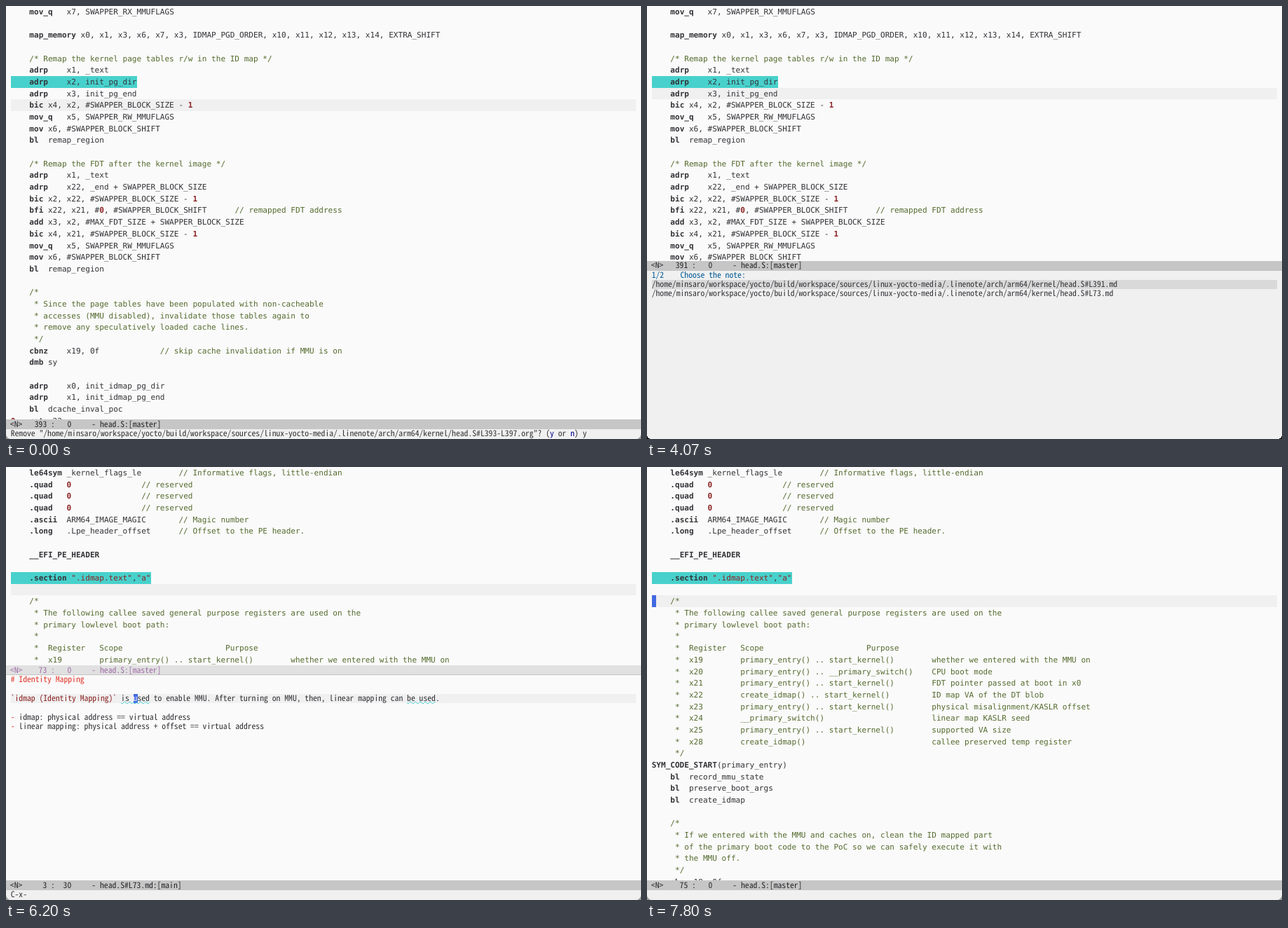
An HTML page for the animation above (8 s loop, 906 by 618 pixels).

```html
<!DOCTYPE html>
<html lang="en">
<head>
<meta charset="utf-8">
<title>Line notes</title>
<style>
:root {
  --code-font: "DejaVu Sans Mono", monospace;
  --ui-font: "Noto Sans Mono CJK KR", "Noto Sans Mono CJK JP", "Noto Sans Mono", monospace;
  --row: 16.6667px;
  --line: 13.3333px;
  --left: 6.6667px;
}
html, body { margin: 0; width: 100%; height: 100%; overflow: hidden; background: #999; }
pre { margin: 0; }
#stage {
  position: relative; width: 906px; height: 618px; overflow: hidden;
  border-radius: 0 0 8px 8px; background: #fafafa; color: #333338;
  text-rendering: geometricPrecision; font-variant-ligatures: none;
}
#stage div, #stage pre { position: absolute; }
.pane { left: 0; width: 906px; overflow: hidden; background: #fafafa; }
.code { left: var(--left); top: var(--code-dy); font: var(--code-size)/var(--row) var(--code-font); }
.ui { left: var(--left); font: var(--ui-size)/var(--line) var(--ui-font); margin-top: var(--ui-dy); }
.hl { left: var(--left); width: 892px; height: var(--row); background: #f0f0f0; }
.mark { left: var(--left); height: var(--row); background: #48d1cc; }
.cur { left: var(--left); width: 6px; height: var(--row); background: #4169e1; }
.small { height: var(--line); }
.k { font-weight: bold; }
.c { color: #556b2f; }
.n { color: #8b2323; font-weight: bold; }
.s { color: #8b2323; }
.bar {
  left: 0; width: 906px; height: 14px; background: #c6c6c6; color: #26262a; white-space: pre;
  font: var(--ui-size)/var(--line) var(--ui-font);
}
.bar span { position: relative; left: 5.8px; top: calc(var(--ui-dy) + .3px); }
.key { color: #00008b; background: #f6f6f6; }
.head { color: #e0372c; }
.wavy { text-decoration: underline wavy #3fd0d4 1px; text-underline-offset: 0; text-decoration-skip-ink: none; }
.blue { color: #005a96; }
#picker { top: 363.67px; height: 255px; background: #f0f0f0; }

/* Hard cuts on one 8 s clock */
.t { opacity: 0; animation: 8s step-end infinite; }
.m { animation: 8s step-end infinite; }
#docA { animation-name: docA; }
#docB { animation-name: docB; }
#shiftB { animation-name: shiftB; }
#hlA { animation-name: rowA; }
#hlB { animation-name: rowB; }
#curA { animation-name: blinkA; }
#curB { animation-name: rowB, blinkB; }
#picker { animation-name: picker; }
#pick { animation-name: pick; }
#curP { animation-name: blinkP; }
.first { animation-name: first; }
.second { animation-name: second; }
#note { animation-name: note; }
#curN { animation-name: blinkN; }
#inkN { animation-name: inkN; }
#barTop { animation-name: gain; }
#barNote { animation-name: note, lose; }
#bar393 { animation-name: bar393; }
#bar73 { animation-name: bar73; }
#bar74 { animation-name: bar74; }
#bar75 { animation-name: bar75; }
#ask { animation-name: ask; }
#keys { animation-name: keys; }

@keyframes docA { 0% { opacity: 1 } 53.375% { opacity: 0 } }
@keyframes docB { 53.375% { opacity: 1 } 100% { opacity: 1 } }
@keyframes shiftB { 0% { top: 0 } 64.125%, 100% { top: -33.3333px } }
@keyframes rowA { 0% { top: 133.333px } 30%, 100% { top: 116.667px } }
@keyframes rowB {
  0% { top: 200px } 79.125% { top: 183.333px }
  96.625% { top: 200px } 97.5%, 100% { top: 216.667px }
}
@keyframes blinkA { 15% { opacity: 1 } 21.625% { opacity: 0 } 26.625% { opacity: 1 } 30% { opacity: 0 } }
@keyframes blinkB { 79.125% { opacity: 1 } 91.625% { opacity: 0 } 96.625%, 100% { opacity: 1 } }
@keyframes picker { 30% { opacity: 1 } 64.125% { opacity: 0 } }
@keyframes pick { 0% { top: 27.33px } 53.375%, 100% { top: 40.67px } }
@keyframes blinkP {
  30% { opacity: 1 } 38.375% { opacity: 0 } 44.125% { opacity: 1 } 50.875% { opacity: 0 }
  53.375% { opacity: 1 } 59.125% { opacity: 0 }
}
@keyframes first { 0% { opacity: 1 } 53.375% { opacity: 0 } }
@keyframes second { 53.375%, 100% { opacity: 1 } }
@keyframes note { 64.125% { opacity: 1 } 85% { opacity: 0 } }
@keyframes blinkN { 64.125% { opacity: 1 } 70% { opacity: 0 } 76.625% { opacity: 1 } 79.125% { opacity: 0 } }
@keyframes inkN { 64.125% { color: #fafafa } 70% { color: #333338 } 76.625% { color: #fafafa } 79.125% { color: #333338 } }
@keyframes gain {
  0% { background: #e1e1e1; color: #a06ca8; box-shadow: inset 0 -1px #c4c4c4 }
  79.125%, 100% { background: #c6c6c6; color: #26262a; box-shadow: none }
}
@keyframes lose {
  0% { background: #c6c6c6; color: #26262a; box-shadow: none }
  79.125%, 100% { background: #e1e1e1; color: #a06ca8; box-shadow: inset 0 -1px #c4c4c4 }
}
@keyframes bar393 { 0% { opacity: 1 } 30% { opacity: 0 } }
@keyframes bar73 { 85% { opacity: 1 } 96.625% { opacity: 0 } }
@keyframes bar74 { 96.625% { opacity: 1 } 97.5% { opacity: 0 } }
@keyframes bar75 { 97.5%, 100% { opacity: 1 } }
@keyframes ask { 0% { opacity: 1 } 26.625% { opacity: 0 } }
@keyframes keys { 76.625% { opacity: 1 } 79.125% { opacity: 0 } 82.5% { opacity: 1 } 85% { opacity: 0 } }
</style>
</head>
<body>
<div id="stage">
  <div id="docA" class="pane t" style="top:0;height:590.33px">
    <div id="hlA" class="hl m"></div>
    <div class="mark" style="top:100px;width:180px"></div>
    <pre id="codeA" class="code"></pre>
    <div id="curA" class="cur t" style="top:133.333px"></div>
  </div>

  <div id="docB" class="pane t" style="top:0;height:590.33px">
    <div id="shiftB" class="m" style="left:0;width:906px;height:640px">
      <div id="hlB" class="hl m"></div>
      <div class="mark" style="top:183.333px;width:200px"></div>
      <pre id="codeB" class="code"></pre>
      <div id="curB" class="cur t"></div>
    </div>
  </div>

  <div id="note" class="pane t" style="top:283.33px;height:307px">
    <div class="hl small" style="top:40.67px"></div>
    <div id="curN" class="cur small t" style="left:182px;top:40.67px"></div>
    <pre class="ui" style="top:14px"><span class="head"># Identity Mapping</span>

<span class="s">`idmap (Identity Mapping)`</span> <span class="wavy">is <span id="inkN" class="m">u</span>sed</span> to enable MMU. After turning on MMU, then, linear mapping can <span class="wavy">be used</span>.

<span class="head">-</span> idmap: physical address == virtual address
<span class="head">-</span> linear mapping: physical address + offset == virtual address</pre>
    <div id="barTop" class="bar m" style="top:0"><span>&lt;N>    73 :   0     - head.S:[master]</span></div>
  </div>

  <div class="pane" style="top:604.33px;height:14px;background:#f0f0f0">
    <pre id="ask" class="ui t" style="top:0">Remove "/home/minsaro/workspace/yocto/build/workspace/sources/linux-yocto-media/.linenote/arch/arm64/kernel/head.S#L393-L397.org"? (<span class="key">y</span> or <span class="key">n</span>) y</pre>
    <pre id="keys" class="ui t" style="top:0">C-x-</pre>
  </div>

  <div id="bar393" class="bar t" style="top:590.33px"><span>&lt;N>   393 :   0     - head.S:[master]</span></div>
  <div id="barNote" class="bar t" style="top:590.33px"><span>&lt;N>     3 :  30     - head.S#L73.md:[main]</span></div>
  <div id="bar73" class="bar t" style="top:590.33px"><span>&lt;N>    73 :   0     - head.S:[master]</span></div>
  <div id="bar74" class="bar t" style="top:590.33px"><span>&lt;N>    74 :   0     - head.S:[master]</span></div>
  <div id="bar75" class="bar t" style="top:590.33px"><span>&lt;N>    75 :   0     - head.S:[master]</span></div>

  <div id="picker" class="pane t">
    <div class="bar t first" style="top:0"><span>&lt;N>   391 :   0     - head.S:[master]</span></div>
    <div class="bar t second" style="top:0"><span>&lt;N>    73 :   0     - head.S:[master]</span></div>
    <div id="pick" class="hl small m" style="background:#d9d9d9"></div>
    <div id="curP" class="cur small t" style="left:147px;top:14px"></div>
    <pre class="ui" style="top:14px"><span class="blue"><span class="t first">1</span>/2    Choose the note: </span>
/home/minsaro/workspace/yocto/build/workspace/sources/linux-yocto-media/.linenote/arch/arm64/kernel/head.S#L391.md
/home/minsaro/workspace/yocto/build/workspace/sources/linux-yocto-media/.linenote/arch/arm64/kernel/head.S#L73.md</pre>
    <pre class="ui blue t second" style="top:14px">2</pre>
  </div>
</div>

<script>
const root = document.documentElement;
const ctx = document.createElement('canvas').getContext('2d');

// Choose the font size for a cell width, and the shift that puts the baseline in place
function fit(name, cell, line, base) {
  const font = getComputedStyle(root).getPropertyValue(`--${name}-font`);
  ctx.font = `100px ${font}`;
  const m = ctx.measureText('0');
  const size = cell / m.width * 100;
  const up = Math.round(m.fontBoundingBoxAscent * size / 100);
  const down = Math.round(m.fontBoundingBoxDescent * size / 100);
  root.style.setProperty(`--${name}-size`, `${size}px`);
  root.style.setProperty(`--${name}-dy`, `${base - (line + up - down) / 2}px`);
}
fit('code', 20 / 3, 50 / 3, 12.9);
fit('ui', 35 / 6, 40 / 3, 11.3);

// Groups: comment, string, keyword, number
const token = /(?<c>\/\/.*|\/\*.*|(?<=^\s*)\*.*)|(?<s>"[^"]*")|(?<k>(?<=^(?:0:)?\s*)[a-z_.][\w.]*)|(?<n>\b\d+\b)/gi;
const paint = text => text.replace(token, (hit, ...rest) => {
  const groups = rest.at(-1);
  const kind = Object.keys(groups).find(g => groups[g] !== undefined);
  return `<span class="${kind}">${hit}</span>`;
});
const fill = (id, text) => {
  document.getElementById(id).innerHTML = text.split('\n').map(paint).join('\n');
};

const use = (reg, scope, purpose) => `     *  ${reg.padEnd(11)}${scope.padEnd(41)}${purpose}`;
const note = (code, col, text) => `    ${code}`.padEnd(col) + `// ${text}`;
const run = 'primary_entry() .. start_kernel()';

fill('codeA', `    mov_q   x7, SWAPPER_RX_MMUFLAGS

    map_memory x0, x1, x3, x6, x7, x3, IDMAP_PGD_ORDER, x10, x11, x12, x13, x14, EXTRA_SHIFT

    /* Remap the kernel page tables r/w in the ID map */
    adrp    x1, _text
    adrp    x2, init_pg_dir
    adrp    x3, init_pg_end
    bic x4, x2, #SWAPPER_BLOCK_SIZE - 1
    mov_q   x5, SWAPPER_RW_MMUFLAGS
    mov x6, #SWAPPER_BLOCK_SHIFT
    bl  remap_region

    /* Remap the FDT after the kernel image */
    adrp    x1, _text
    adrp    x22, _end + SWAPPER_BLOCK_SIZE
    bic x2, x22, #SWAPPER_BLOCK_SIZE - 1
${note('bfi x22, x21, #0, #SWAPPER_BLOCK_SHIFT', 48, 'remapped FDT address')}
    add x3, x2, #MAX_FDT_SIZE + SWAPPER_BLOCK_SIZE
    bic x4, x21, #SWAPPER_BLOCK_SIZE - 1
    mov_q   x5, SWAPPER_RW_MMUFLAGS
    mov x6, #SWAPPER_BLOCK_SHIFT
    bl  remap_region

    /*
     * Since the page tables have been populated with non-cacheable
     * accesses (MMU disabled), invalidate those tables again to
     * remove any speculatively loaded cache lines.
     */
${note('cbnz    x19, 0f', 32, 'skip cache invalidation if MMU is on')}
    dmb sy

    adrp    x0, init_idmap_pg_dir
    adrp    x1, init_idmap_pg_end
    bl  dcache_inval_poc
0:  ret x22`);

fill('codeB', `${note('.quad   0', 28, 'Image load offset from start of RAM, little-endian')}
${note('le64sym _kernel_size_le', 36, 'Effective size of kernel image, little-endian')}
${note('le64sym _kernel_flags_le', 36, 'Informative flags, little-endian')}
${Array(3).fill(note('.quad   0', 28, 'reserved')).join('\n')}
${note('.ascii  ARM64_IMAGE_MAGIC', 36, 'Magic number')}
${note('.long   .Lpe_header_offset', 36, 'Offset to the PE header.')}

    __EFI_PE_HEADER

    .section ".idmap.text","a"

    /*
     * The following callee saved general purpose registers are used on the
     * primary lowlevel boot path:
     *
     *  Register   Scope                      Purpose
${use('x19', run, 'whether we entered with the MMU on')}
${use('x20', 'primary_entry() .. __primary_switch()', 'CPU boot mode')}
${use('x21', run, 'FDT pointer passed at boot in x0')}
${use('x22', 'create_idmap() .. start_kernel()', 'ID map VA of the DT blob')}
${use('x23', run, 'physical misalignment/KASLR offset')}
${use('x24', '__primary_switch()', 'linear map KASLR seed')}
${use('x25', run, 'supported VA size')}
${use('x28', 'create_idmap()', 'callee preserved temp register')}
     */
SYM_CODE_START(primary_entry)
    bl  record_mmu_state
    bl  preserve_boot_args
    bl  create_idmap

    /*
     * If we entered with the MMU and caches on, clean the ID mapped part
     * of the primary boot code to the PoC so we can safely execute it with
     * the MMU off.
     */
    cbz x19, 0f`);
</script>
</body>
</html>
```
